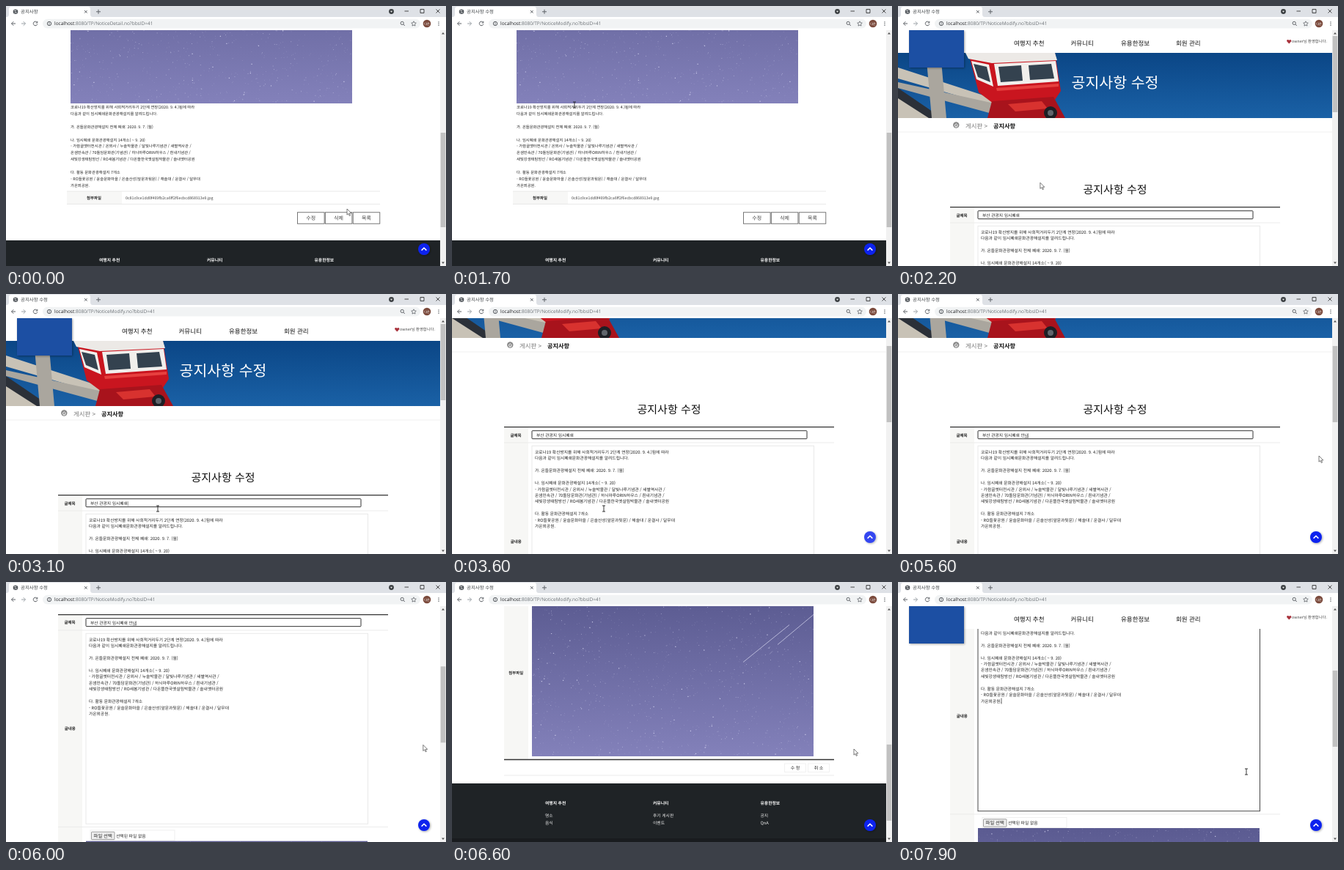
An HTML page for the animation above (8000 ms loop, 600 px wide and 355 px high).

```html
<!DOCTYPE html>
<html lang="ko">
<head>
<meta charset="utf-8">
<title>공지사항 수정</title>
<style>
html, body { margin: 0; width: 100%; height: 100%; overflow: hidden; background: #fff; }
svg { display: block; width: 600px; height: 355px; }
text { font-family: "Noto Sans CJK KR", "Noto Sans CJK JP", "Noto Sans", sans-serif; text-rendering: geometricPrecision; white-space: pre; }
.ui { font-family: "Open Sans", "Noto Sans CJK KR", sans-serif; }
</style>
</head>
<body>
<svg id="stage" viewBox="0 0 600 355" xmlns="http://www.w3.org/2000/svg"></svg>
<script>
const LOOP = 8000;
const MAIN = "fill='none' stroke='#5f6368' stroke-width='1'";

// Text is placed by the vertical middle of its line.
const text = (x, y, size, str, attrs = "fill='#222'") =>
  `<text x="${x}" y="${(y + size * 0.37).toFixed(2)}" font-size="${size}" ${attrs}>${str}</text>`;
const centered = (x, y, size, str, attrs = "fill='#222'") => text(x, y, size, str, `text-anchor="middle" ${attrs}`);
const rect = (x, y, w, h, fill, attrs = "") =>
  `<rect x="${x}" y="${y}" width="${w}" height="${h}" fill="${fill}" ${attrs}/>`;
const box = (x, y, w, h, stroke, attrs = "") => rect(x, y, w, h, "#fff", `stroke="${stroke}" ${attrs}`);
const path = (d, attrs) => `<path d="${d}" ${attrs}/>`;
const BOLD = "font-weight='700' fill='#222'";

const notice = [
  "코로나19 확산방지를 위해 사회적거리두기 2단계 연장(2020. 9. 4.)됨에 따라",
  "다음과 같이 임시폐쇄문화관광해설지를 알려드립니다.",
  "",
  "가. 온들문화관광해설지 전체 폐쇄: 2020. 9. 7. (월)",
  "",
  "나. 임시폐쇄 문화관광해설지 14개소( ~ 9. 20)",
  "- 가람골옛터전시관 / 온뫼사 / 누솔박물관 / 달빛나루기념관 / 새별역사관 /",
  "온샘민속관 / 70돌담문화관(기념관) / 하늬마루ORIN하우스 / 흰내기념관 /",
  "새빛강생태탐방선 / RO새봄기념관 / 다온뜰한국옛살림박물관 / 솔내옛터공원",
  "",
  "다. 활동 문화관광해설지 7개소",
  "- RO들꽃공원 / 윤슬문화마을 / 은솔산성(앞문과뒷문) / 해솔대 / 운결사 / 달무대",
  "가온뫼공원."
];
const noticeText = (x, y, size, leading) =>
  notice.map((line, i) => text(x, y + i * leading, size, line)).join("");

function random(seed) {
  return () => (seed = (seed * 16807) % 2147483647) / 2147483647;
}

function nightSky() {
  const next = random(77);
  const stars = (count, size, alpha) => {
    let d = "";
    for (let i = 0; i < count; i++) d += `M${(next() * 383).toFixed(1)} ${(next() * 213.5).toFixed(1)}h${size}`;
    return path(d, `stroke="#dcdcf6" stroke-width="${size}" opacity="${alpha}"`);
  };
  return `<symbol id="sky" width="384" height="214.5">${rect(0, 0, 384, 214.5, "url(#dusk)")}
    ${stars(800, 0.7, 0.35)}${stars(260, 0.9, 0.55)}${stars(50, 1.2, 0.8)}
    ${path("M288 86L351 35M335 62L384 21", "stroke='#d8d8f0' stroke-width='.9' opacity='.8'")}
    ${path("M324 75l4-4", "stroke='#d8d8f0' stroke-width='.7' opacity='.5'")}</symbol>`;
}

function defs() {
  const gradient = (id, from, to) => `<linearGradient id="${id}" x2="0" y2="1">
    <stop stop-color="${from}"/><stop offset="1" stop-color="${to}"/></linearGradient>`;
  return `<defs>${gradient("dusk", "#5b5b91", "#8381ba")}${gradient("blue", "#0b4686", "#1a61a6")}
    <clipPath id="view"><rect y="33" width="592" height="322"/></clipPath>
    <clipPath id="banner"><rect y="64" width="592" height="89"/></clipPath>
    <filter id="soft" x="-50%" y="-50%" width="200%" height="200%">
      <feDropShadow dx="1" dy="1" stdDeviation="1.5" flood-opacity=".35"/></filter>
    ${nightSky()}</defs>`;
}

function browser() {
  return rect(0, 0, 600, 15, "#dee1e6") + path("M1 15q3 0 3-4V4q0-3 3-3H112q3 0 3 3v7q0 4 3 4z", "fill='#fff'") +
    rect(0, 15, 600, 18, "#fff") + rect(50, 17.8, 515, 12.6, "#f1f3f4", "rx='6.3'") +
    `<circle cx="13" cy="7.8" r="3.3" fill="#50555a"/>` + path("M11 6l2 1 1-1.4M11.6 9.6l1.5-1 1.7.6", "fill='none' stroke='#fff' stroke-width='.8'") +
    path("M107 6l3.6 3.6m0-3.6L107 9.6M126 4.8v6M123 7.8h6", MAIN) +
    `<circle cx="525.5" cy="7.5" r="3.4" fill="#3c4043"/>` + path("M524 6.8h3l-1.5 2z", "fill='#fff'") +
    path("M543.5 7h5.5M565 4.5h5v5h-5zM586.5 4.5l5 5m0-5l-5 5", "fill='none' stroke='#222' stroke-width='.8'") +
    path("M13 24H7.5m2.8-2.8L7.5 24l2.8 2.8", MAIN) +
    path("M21 24h5.5m-2.8-2.8l2.8 2.8-2.8 2.8", "fill='none' stroke='#9aa0a6' stroke-width='1'") +
    path("M42.4 22.4a2.8 2.8 0 1 0 .4 2.2M42.8 20.8v2.2h-2.2", MAIN) +
    `<circle cx="59" cy="24" r="2.7" ${MAIN}/>` + path("M59 23.5v2M59 22v.8", MAIN) +
    `<circle cx="540.2" cy="23.4" r="2.1" ${MAIN}/>` + path("M541.8 25l2 2", MAIN) +
    path("M556 20.8l1 2.1 2.3.3-1.7 1.6.4 2.3-2-1.1-2 1.1.4-2.3-1.7-1.6 2.3-.3z", "fill='none' stroke='#5f6368' stroke-width='.8'") +
    `<circle cx="574" cy="24" r="5.3" fill="#7b4a3c"/>` + centered(574, 24, 4.2, "다온", "fill='#fff'") +
    path("M590 21.2v1.2M590 23.5v1.2M590 25.8v1.2", "stroke='#5f6368' stroke-width='1.2'") +
    `<text id="tab" class="ui" x="20" y="10" font-size="6.4" fill="#3c4043"></text>
     <text class="ui" x="66" y="26.3" font-size="6.5" fill="#6b7075"><tspan fill="#202124">localhost</tspan><tspan id="url"></tspan></text>`;
}

function scrollbar() {
  return rect(592, 33, 8, 322, "#f1f1f1") + rect(592.7, 41, 6.6, 104, "#c1c1c1", "id='thumb'") +
    path("M594 38.5l2-2.4 2 2.4zM594 349.5l2 2.4 2-2.4z", "fill='#505050'");
}

function footer(y) {
  const columns = [[127, "여행지 추천", "명소", "음식"], [274, "커뮤니티", "후기 게시판", "이벤트"], [420.5, "유용한정보", "공지", "QnA"]];
  return rect(0, y, 592, 142, "#1f2326") + rect(0, y + 75, 592, 67, "#191c1f") +
    columns.map(([x, head, a, b]) => text(x, y + 26.5, 5.8, head, "fill='#fff' font-weight='700'") +
      text(x, y + 43.5, 5.8, a, "fill='#eee'") + text(x, y + 54, 5.8, b, "fill='#eee'")).join("");
}

function detailPage() {
  const button = (x, label) => box(x, 281.8, 36.6, 15.4, "#555", "stroke-width='.8'") + centered(x + 18.3, 289.5, 7, label, "fill='#444' font-weight='300'");
  return rect(0, 33, 592, 322, "#fff") + `<use href="#sky" x="88" y="-81.5"/>` + noticeText(88, 138.2, 5.33, 8.87) +
    rect(83, 253, 75, 17.5, "#f7f7f6") + path("M83 253H510M83 270.5H510", "stroke='#e4e4e4' stroke-width='.8'") +
    centered(120, 262, 5.4, "첨부파일", BOLD) + text(163, 262, 5.25, "0c81c0ce1dd0f469fb2ca6ff2f6ecbcd868913e9.jpg", "fill='#444'") +
    button(397.5, "수정") + button(435.3, "삭제") + button(473.2, "목록") + footer(320);
}

function hero() {
  return `<g clip-path="url(#banner)">${rect(0, 64, 592, 89, "url(#blue)")}
    ${path("M0 112L60 153H0z", "fill='#2b3038'")}
    ${path("M0 84L135 128V138L0 99zM0 126L42 153H0z", "fill='#c8c2b6'")}
    ${path("M38 64H58L66 153H46zM0 104L190 146V153H150L0 112z", "fill='#aaa69e'")}
    ${path("M96 64H214L222 116 214 128 130 133 110 118z", "fill='#c9151f'")}
    ${path("M92 64H214L217 74 128 78 96 72z", "fill='#ece9e6'")}
    ${path("M100 75L124 80 130 110 107 100zM131 79L215 75 219 103 136 109z", "fill='#f1efec'")}
    ${path("M103 79L121 83 126 104 109 97zM137 83L168 81 170 102 140 104zM178 81L209 79 213 99 180 101z", "fill='#34424f'")}
    ${path("M134 112L219 106 219 110 135 116z", "fill='#e7403f'")}
    ${path("M128 130L212 124 228 153H122z", "fill='#a8131c'")}
    ${path("M150 134L196 130 204 140 160 144z", "fill='#d8322f'")}
    <circle cx="208" cy="146" r="9" fill="#1d1f25"/><circle cx="208" cy="146" r="4" fill="#60656c"/></g>` +
    centered(296, 104.5, 20.5, "공지사항 수정", "fill='#fff' font-weight='500'");
}

function modifyPage() {
  const faint = "stroke='#e6e6e6' stroke-width='.8'";
  const button = (x, label) => box(x, 808, 29, 11.5, "#eee", "stroke-width='.8'") + centered(x + 14.5, 813.8, 6, label);
  return rect(0, 33, 592, 950, "#fff") + hero() +
    `<circle cx="79.3" cy="162.5" r="4.2" fill="#8a8a8a"/>` + path("M76.8 163l2.5-2.2 2.5 2.2M78 163v2h2.6v-2", "fill='none' stroke='#fff' stroke-width='.9'") +
    text(92, 163.5, 8.4, "게시판 &gt;", "fill='#777' font-weight='500'") + text(130, 163.5, 8.2, "공지사항", "fill='#111' font-weight='700'") +
    path("M0 172H592", "stroke='#ededed' stroke-width='.8'") +
    centered(296, 250, 15, "공지사항 수정", "fill='#111' font-weight='500'") +
    rect(71, 275, 33, 527, "#f7f7f5") + path("M71 296H521M71 564.5H521M71 824H521", faint) +
    path("M71 274.7H521M71 802.5H521", "stroke='#333' stroke-width='1.3'") +
    centered(87, 285.5, 5.5, "글제목", BOLD) + centered(87.3, 430.5, 5.5, "글내용", BOLD) + centered(87.2, 684, 5.4, "첨부파일", BOLD) +
    box(109, 279.7, 375, 11, "#333", "stroke-width='1' rx='.8'") +
    text(115, 285.5, 5.75, "<tspan id='subject'></tspan><tspan id='composing' text-decoration='underline'></tspan><tspan id='titleCaret' font-weight='300'>|</tspan>") +
    box(109, 300.3, 384.5, 260, "#e6e6e6", "id='area' stroke-width='.9'") + noticeText(113, 308.7, 5.75, 8.45) +
    path("M141 406v8", "id='bodyCaret' stroke='#222' stroke-width='.7'") +
    box(115, 569, 115, 14, "#e8e8e8", "stroke-width='.7'") + rect(116.5, 571.3, 31.5, 10.4, "#efefef", "stroke='#777' stroke-width='.7' rx='.7'") +
    centered(132.2, 576.5, 6.4, "파일 선택") + text(150, 576.5, 5.8, "선택된 파일 없음") +
    `<use href="#sky" x="109" y="583.5"/>` + button(453.5, "수 정") + button(485.5, "취 소") + footer(835);
}

function header() {
  const menu = [[158, "여행지 추천"], [235.5, "커뮤니티"], [304, "유용한정보"], [379, "회원 관리"]];
  return rect(0, 33, 592, 31, "#fff") + rect(15, 33, 75, 51, "#1b4fa3", "filter='url(#soft)'") +
    menu.map(([x, label]) => text(x, 50.5, 8.5, label, "fill='#111' font-weight='500'")).join("") +
    path("M533.3 51.5l-3-3.2q-.6-2.4 1.4-2.4 1.2.1 1.6 1.2.5-1.2 1.7-1.2 1.9.1 1.3 2.4z", "fill='#a8323c'") +
    text(537, 48.5, 5.3, "owner님 환영합니다.", "fill='#444'");
}

const topButton = `<circle cx="570" cy="332" r="8" fill="#0b24ee" filter="url(#soft)"/>` +
  path("M566.6 333.6l3.4-3.3 3.4 3.3", "fill='none' stroke='#fff' stroke-width='1.5'");

document.getElementById("stage").innerHTML = defs() +
  `<g clip-path="url(#view)"><g id="detail">${detailPage()}</g><g id="modify">${modifyPage()}</g>
   <g id="header">${header()}</g><g id="top">${topButton}</g></g>` + scrollbar() + browser() +
  `<g id="pointer">${path("M0 0v8.2l1.9-1.7 1.4 3 1.3-.6-1.4-2.9h2.7z", "id='arrow' fill='#fff' stroke='#444' stroke-width='.7'")}
   ${path("M-2 -4h4M0 -4v8M-2 4h4", "id='beam' fill='none' stroke='#222' stroke-width='.9'")}</g>`;

const el = Object.fromEntries([...document.querySelectorAll("#stage [id]")].map(node => [node.id, node]));
const show = (node, on) => node.setAttribute("visibility", on ? "inherit" : "hidden");
const move = (node, x, y) => node.setAttribute("transform", `translate(${x} ${y})`);
const ramp = (t, from, to) => Math.min(1, Math.max(0, (t - from) / (to - from)));
const ease = k => k * k * (3 - 2 * k);

// Keys are [time, value, value...]; values ease from one key to the next.
function track(keys, t) {
  const i = keys.findIndex(key => key[0] > t);
  if (i < 0) return keys[keys.length - 1].slice(1);
  const [a, b] = [keys[i - 1], keys[i]];
  const k = ease(ramp(t, a[0], b[0]));
  return a.slice(1).map((v, n) => v + (b[n + 1] - v) * k);
}

const scrollKeys = [[0, 0], [3150, 0], [3550, 93], [5750, 93], [6450, 560], [6800, 560], [7450, 247.5]];
const pointerKeys = [[0, 465, 277], [500, 418, 288], [950, 418, 288], [1650, 167, 135], [1800, 167, 135], [2450, 207, 293],
  [4950, 207, 293], [5500, 574, 221], [5800, 574, 221], [6500, 548, 228], [6800, 548, 228], [7500, 475, 259]];
const typing = [[0, "", ""], [4000, " ", ""], [4200, " ", "ㅇ"], [4350, " ", "아"], [4500, " ", "안"], [4750, " 안", "ㄴ"], [4950, " 안", "내"]];

function draw(t) {
  const loaded = t >= 1800;
  const scroll = track(scrollKeys, t)[0];
  el.tab.textContent = t < 800 ? "공지사항" : "공지사항 수정";
  el.url.textContent = `:8080/TP/Notice${t < 800 ? "Detail" : "Modify"}.no?bbsID=41`;
  show(el.detail, !loaded);
  show(el.modify, loaded);
  show(el.header, loaded);
  move(el.modify, 0, -scroll);
  move(el.header, 0, -58 * (ramp(t, 3180, 3400) - ramp(t, 6820, 7040)));
  el.top.setAttribute("opacity", loaded ? ramp(t, 3350, 3650) : 1);
  el.thumb.setAttribute("y", loaded ? 41 + scroll * 0.323 : 173);
  el.thumb.setAttribute("height", loaded ? 104 : 129);

  const [, typed, composing] = typing.findLast(key => t >= key[0]);
  el.subject.textContent = "부산 관광지 임시폐쇄" + typed;
  el.composing.textContent = composing;
  show(el.titleCaret, loaded && t >= 2650 && t < 4200 && (t - 2650) % 1000 < 500);
  const editing = t >= 7600;
  el.area.setAttribute("stroke", editing ? "#333" : "#e6e6e6");
  show(el.bodyCaret, editing);

  move(el.pointer, ...track(pointerKeys, t));
  const beam = (t > 1500 && t < 1800) || (t > 2350 && t < 5200) || t > 7100;
  show(el.beam, beam);
  show(el.arrow, !beam);
}

function tick() {
  draw(performance.now() % LOOP);
  requestAnimationFrame(tick);
}
tick();
</script>
</body>
</html>
```
